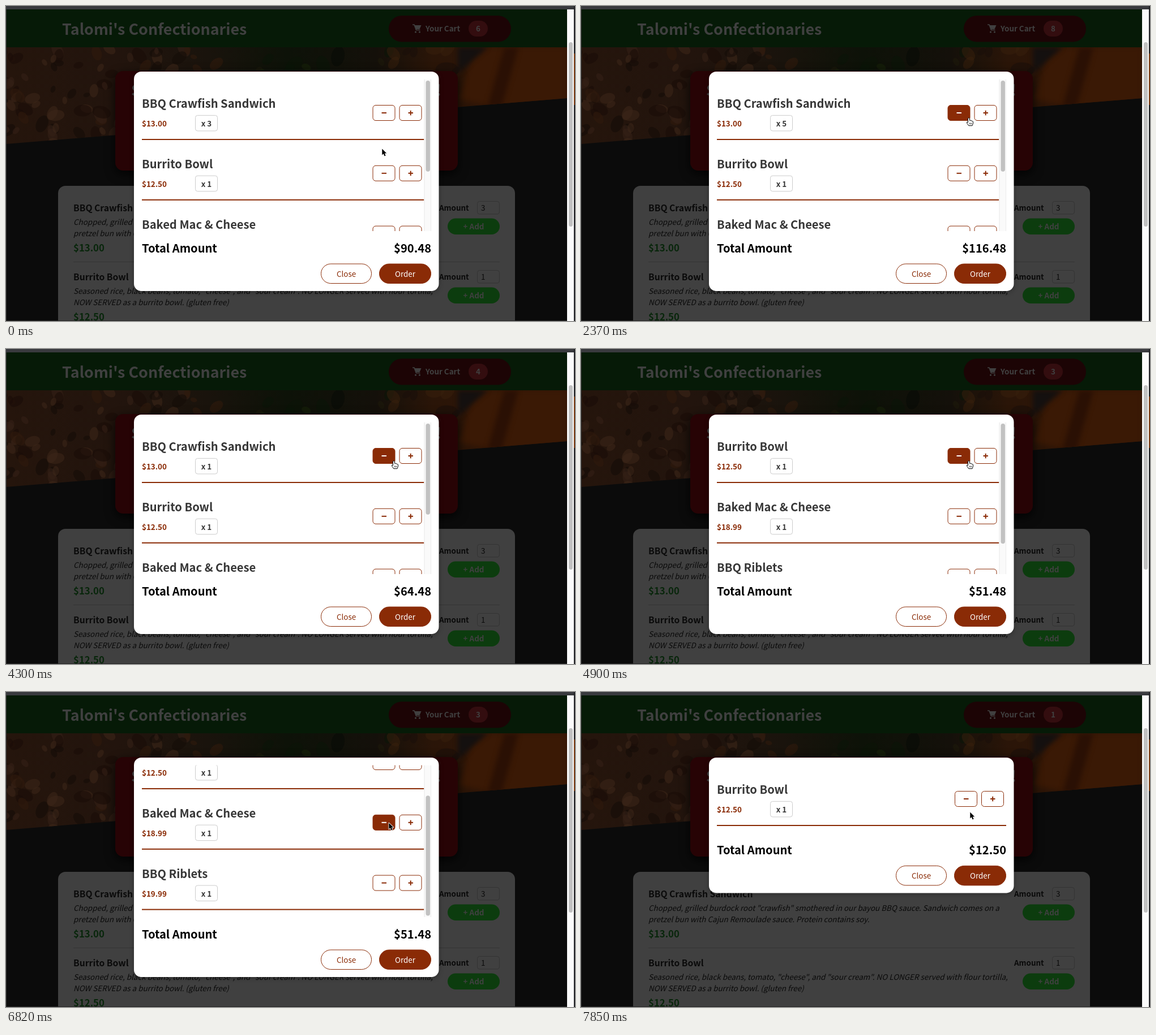
An HTML page with a canvas that plays this animation: 1005 px wide and 557 px high, repeating every 7.99 s.

```html
<!DOCTYPE html>
<html lang="en">
<head>
<meta charset="utf-8">
<title>Cart</title>
<style>
  html, body { margin: 0; width: 100%; height: 100%; overflow: hidden; background: #0b0b0b; }
  canvas { display: block; width: 1005px; height: 557px; }
</style>
</head>
<body>
<canvas id="stage" width="1005" height="557"></canvas>
<script>
const LOOP = 7990, W = 1005, H = 557;
const REM = 13.43, PITCH = 106.8, LIST_TOP = 129.4, LIST_MAX = 268.6;
const RUST = '#8a2b06', INK = '#363636', DIM = '#404040';
const FAMILY = '"Noto Sans CJK JP", "Noto Sans CJK SC", "Noto Sans CJK", "Noto Sans", sans-serif';

const stage = document.getElementById('stage').getContext('2d');
const page = document.createElement('canvas');
page.width = W;
page.height = H;
let g = page.getContext('2d');

const MENU = [
  { name: 'BBQ Crawfish Sandwich', price: 13, count: 3 },
  { name: 'Burrito Bowl', price: 12.5, count: 1 },
  { name: 'Baked Mac & Cheese', price: 18.99, count: 1 },
  { name: 'BBQ Riblets', price: 19.99, count: 1 },
];

// time, item, change
const CLICKS = [
  [1030, 0, 1], [1780, 0, 1],
  [2970, 0, -1], [3410, 0, -1], [3860, 0, -1], [4300, 0, -1], [4900, 0, -1],
  [6960, 2, -1], [7700, 3, -1],
];

// time, x, y, pointing hand
const MOVES = [
  [0, 664, 252, 0], [150, 669, 244, 0], [300, 682, 228, 0], [450, 698, 209, 0],
  [590, 709, 197, 0], [740, 711, 195, 0], [890, 711, 195, 1], [1480, 711, 194, 1],
  [2070, 703, 198, 1], [2220, 691, 199, 0], [2370, 685, 198, 1],
  [5190, 685, 198, 0], [6080, 684, 201, 0], [6230, 682, 208, 0], [6380, 680, 217, 0],
  [6520, 678, 225, 0], [6670, 677, 229, 0], [6820, 676, 231, 0], [6960, 676, 232, 1],
  [7110, 677, 278, 0], [7250, 678, 287, 0], [7400, 678, 289, 1], [7850, 687, 212, 0],
];

const SCROLLS = [[0, 0], [5190, 14], [5340, 48], [5480, 65]];

const latest = (steps, t) => steps.filter(s => s[0] <= t).pop();
const money = v => '$' + v.toFixed(2);

function text(str, x, y, { size = REM, color = INK, style = 'bold', align = 'left' } = {}) {
  g.font = `${style} ${size}px ${FAMILY}`;
  g.fillStyle = color;
  g.textAlign = align;
  g.fillText(str, x, y);
}

function box(x, y, w, h, r, fill, stroke) {
  g.beginPath();
  g.roundRect(x, y, w, h, r);
  if (fill) { g.fillStyle = fill; g.fill(); }
  if (stroke) { g.strokeStyle = stroke; g.lineWidth = 1; g.stroke(); }
}

function rect(x, y, w, h, fill) {
  g.fillStyle = fill;
  g.fillRect(x, y, w, h);
}

function shape(points, fill) {
  g.beginPath();
  points.forEach(([x, y]) => g.lineTo(x, y));
  g.closePath();
  if (fill) { g.fillStyle = fill; g.fill(); }
}

function random(seed) {
  const v = Math.sin(seed * 127.1 + 3.7) * 43758.5453;
  return v - Math.floor(v);
}

function scatter(n, seed, x, w, size, colors, alpha) {
  g.globalAlpha = alpha;
  for (let i = 0; i < n; i++) {
    const r = k => random(seed + i * 5 + k);
    const rad = size * (0.5 + r(2));
    g.beginPath();
    g.ellipse(x + w * r(0), 73 + 172 * r(1), rad, rad * 0.65, r(3) * Math.PI, 0, Math.PI * 2);
    g.fillStyle = colors[Math.floor(r(4) * colors.length)];
    g.fill();
  }
  g.globalAlpha = 1;
}

function drawPhoto() {
  g.save();
  shape([[0, 73], [991, 73], [991, 163], [0, 244]]);
  g.clip();
  const base = g.createLinearGradient(0, 0, 991, 0);
  [[0, '#25150c'], [0.2, '#22140d'], [0.36, '#19130c'], [0.5, '#0d1208'],
   [0.66, '#14100a'], [0.76, '#2a1508'], [1, '#331505']]
    .forEach(([at, color]) => base.addColorStop(at, color));
  rect(0, 73, 991, 175, base);
  scatter(110, 1, -5, 380, 11, ['#352016', '#1a0d07', '#301a0c', '#140d08', '#3b2618'], 0.6);
  scatter(50, 700, 390, 290, 12, ['#0b1507', '#172209', '#080b06', '#1d190b'], 0.6);
  scatter(24, 1200, 660, 160, 14, ['#2c1609', '#180f0a', '#38200d'], 0.5);
  g.filter = 'blur(4px)';
  shape([[800, 165], [822, 95], [852, 73], [991, 73], [991, 175], [870, 180]], '#3a1905');
  shape([[798, 73], [850, 73], [828, 92], [798, 120]], '#14100f');
  shape([[880, 73], [905, 73], [875, 180], [850, 180]], '#2a1004');
  g.filter = 'none';
  g.restore();
}

function drawCartIcon() {
  g.strokeStyle = DIM;
  g.lineWidth = 1.7;
  g.beginPath();
  g.moveTo(718, 33);
  g.lineTo(721, 33);
  g.lineTo(724.5, 42.5);
  g.lineTo(731.5, 42.5);
  g.stroke();
  shape([[721.5, 34], [733.5, 34], [730.5, 41], [724, 41]], DIM);
  [[723.5, 46], [730.5, 46]].forEach(([x, y]) => {
    g.beginPath();
    g.arc(x, y, 1.6, 0, Math.PI * 2);
    g.fill();
  });
}

function drawMeal(dy, name, lines, price, amount) {
  const black = '#0a0a0a';
  text(name, 119, 362.5 + dy, { size: REM * 1.17, color: black });
  lines.forEach((line, i) => text(line, 119, 386.5 + dy + i * 20.2, { style: 'italic', color: black }));
  text(money(price), 119, 433.5 + dy, { size: REM * 1.25, color: '#08260b' });
  text('Amount', 765, 361.7 + dy, { color: black });
  box(832.5, 345.5 + dy, 39, 22.5, 4, null, '#333333');
  text(amount, 839, 361.7 + dy, { style: '', color: black });
  box(780, 375.5 + dy, 92, 28.5, 14.2, '#0c3c0e');
  text('+ Add', 826, 394.5 + dy, { color: DIM, align: 'center' });
}

function drawPage() {
  rect(0, 0, W, H, '#0b0b0b');
  drawPhoto();
  rect(0, 6, 991, 67, '#061a07');
  text("Talomi's Confectionaries", 99, 50.7, { size: REM * 2, color: DIM });
  box(676, 17, 216, 46.5, 23.2, '#1c0405');
  drawCartIcon();
  text('Your Cart', 741, 45.3, { color: DIM });
  box(817, 26, 34, 28, 14, '#330d0f');

  g.shadowColor = 'rgba(0,0,0,.8)';
  g.shadowBlur = 18;
  g.shadowOffsetY = 6;
  box(193, 115, 605, 176, 14, '#270305');
  g.shadowColor = 'transparent';
  text('S', 221, 159, { size: REM * 2, color: DIM });
  text('!', 769, 159, { size: REM * 2, color: DIM, align: 'right' });

  box(92, 318, 807, 260, 13, DIM);
  drawMeal(0, 'BBQ Crawfish Sandwich', [
    'Chopped, grilled burdock root "crawfish" smothered in our bayou BBQ sauce. Sandwich comes on a',
    'pretzel bun with Cajun Remoulade sauce. Protein contains soy.'], 13, '3');
  rect(119, 452, 753, 1, '#343434');
  drawMeal(122, 'Burrito Bowl', [
    'Seasoned rice, black beans, tomato, "cheese", and "sour cream". NO LONGER served with flour tortilla,',
    'NOW SERVED as a burrito bowl. (gluten free)'], 12.5, '1');

  rect(0, 0, W, 6, '#393a3e');
  rect(0, 6, 1, H, '#2c2c2c');
  rect(0, 556, 991, 1, '#242424');
  rect(991, 6, 12, 551, '#fbfbfb');
  box(994, 64, 7, 326, 3.5, '#c1c1c1');
  rect(1003, 0, 2, H, '#202124');
  rect(1003, 84, 2, 91, '#7a3a12');
}

function drawStepper(x, y, plus, cursor) {
  const hot = cursor.x >= x && cursor.x <= x + 40 && cursor.y >= y && cursor.y <= y + 28 &&
    cursor.y < LIST_TOP + LIST_MAX;
  box(x + 0.5, y + 0.5, 39, 27, 5, hot ? RUST : '#fff', RUST);
  const color = hot ? '#fff' : RUST;
  rect(x + 16, y + 13, 8.5, 2, color);
  if (plus) rect(x + 19.2, y + 9.8, 2, 8.5, color);
}

function drawRow(item, y, right, cursor) {
  text(item.name, 240, y + 50.6, { size: REM * 1.5 });
  text(money(item.price), 240, y + 83.6, { color: RUST });
  box(334.5, y + 64, 39, 27.5, 4, null, '#cccccc');
  text('x ' + item.count, 354, y + 83.6, { align: 'center' });
  drawStepper(right - 91, y + 45.6, false, cursor);
  drawStepper(right - 44, y + 45.6, true, cursor);
  rect(240, y + 105.6, right - 240, 2, RUST);
}

function drawScrollbar(content, scroll) {
  rect(738.5, LIST_TOP, 12.5, LIST_MAX, '#fafafa');
  rect(738.5, LIST_TOP, 1, LIST_MAX, '#e8e8e8');
  rect(750, LIST_TOP, 1, LIST_MAX, '#ededed');
  const track = LIST_MAX - 5;
  const thumb = track * LIST_MAX / content;
  const travel = (track - thumb) / (content - LIST_MAX);
  box(741.5, LIST_TOP + 2.5 + scroll * travel, 7.5, thumb, 3.7, '#c1c1c1');
}

function drawModal(items, scrollAt, cursor) {
  const content = items.length * PITCH + 13.2;
  const height = Math.min(LIST_MAX, content);
  const overflow = content > LIST_MAX;
  const scroll = overflow ? scrollAt : 0;
  const foot = LIST_TOP + height;

  g.shadowColor = 'rgba(0,0,0,.3)';
  g.shadowBlur = 8;
  g.shadowOffsetY = 2;
  box(226, 116, 538.5, foot + 106 - 116, 13, '#fff');
  g.shadowColor = 'transparent';

  g.save();
  g.beginPath();
  g.rect(226, LIST_TOP, 538, height);
  g.clip();
  const right = overflow ? 738.5 : 751;
  items.forEach((item, i) => drawRow(item, LIST_TOP + i * PITCH - scroll, right, cursor));
  if (overflow) drawScrollbar(content, scroll);
  g.restore();

  const total = items.reduce((sum, item) => sum + item.price * item.count, 0);
  const big = { size: REM * 1.5, color: '#000' };
  text('Total Amount', 240, foot + 37.8, big);
  text(money(total), 751, foot + 37.8, { ...big, align: 'right' });
  box(556.5, foot + 58, 89, 34.5, 17.2, '#fff', RUST);
  box(659.5, foot + 58, 91, 34.5, 17.2, RUST, RUST);
  text('Close', 601, foot + 80.8, { style: '', color: RUST, align: 'center' });
  text('Order', 705, foot + 80.8, { style: '', color: '#fff', align: 'center' });
}

function drawCursor({ x, y, hand }) {
  g.save();
  g.translate(x, y);
  g.lineJoin = 'round';
  if (hand) {
    g.beginPath();
    g.moveTo(-1.6, 8);
    g.lineTo(-1.6, 0.8);
    g.quadraticCurveTo(0, -1.4, 1.3, 0.8);
    g.lineTo(1.5, 4.4);
    g.quadraticCurveTo(3, 3.4, 3.9, 5);
    g.quadraticCurveTo(5.4, 4.2, 6, 5.7);
    g.quadraticCurveTo(7.6, 5.4, 7.6, 7.4);
    g.quadraticCurveTo(7.6, 10.5, 6, 13.6);
    g.lineTo(-0.3, 13.6);
    g.quadraticCurveTo(-2.2, 10.6, -3.8, 8.4);
    g.quadraticCurveTo(-3.8, 6.4, -1.6, 8);
    g.fillStyle = '#fff';
    g.strokeStyle = '#000';
    g.lineWidth = 1;
    g.fill();
    g.stroke();
    g.beginPath();
    [1.2, 3, 4.8].forEach(fx => { g.moveTo(fx, 8.6); g.lineTo(fx, 11.4); });
    g.lineWidth = 0.7;
    g.stroke();
  } else {
    shape([[0.3, 0.5], [0.3, 11.6], [2.8, 9.3], [4.6, 13.4], [6.6, 12.5], [4.8, 8.6], [8.2, 8.4]]);
    g.strokeStyle = '#fff';
    g.lineWidth = 1.6;
    g.stroke();
    g.fillStyle = '#000';
    g.fill();
  }
  g.restore();
}

function render(t) {
  const items = MENU.map(item => ({ ...item }));
  CLICKS.forEach(([at, i, change]) => { if (t >= at) items[i].count += change; });
  const cart = items.filter(item => item.count > 0);
  const [, x, y, hand] = latest(MOVES, t);
  const cursor = { x, y, hand };

  g.drawImage(page, 0, 0);
  const count = cart.reduce((sum, item) => sum + item.count, 0);
  text(String(count), 834, 45.3, { color: DIM, align: 'center' });
  drawModal(cart, latest(SCROLLS, t)[1], cursor);
  drawCursor(cursor);
}

drawPage();
g = stage;

function tick() {
  render(performance.now() % LOOP);
  requestAnimationFrame(tick);
}
tick();
</script>
</body>
</html>
```
